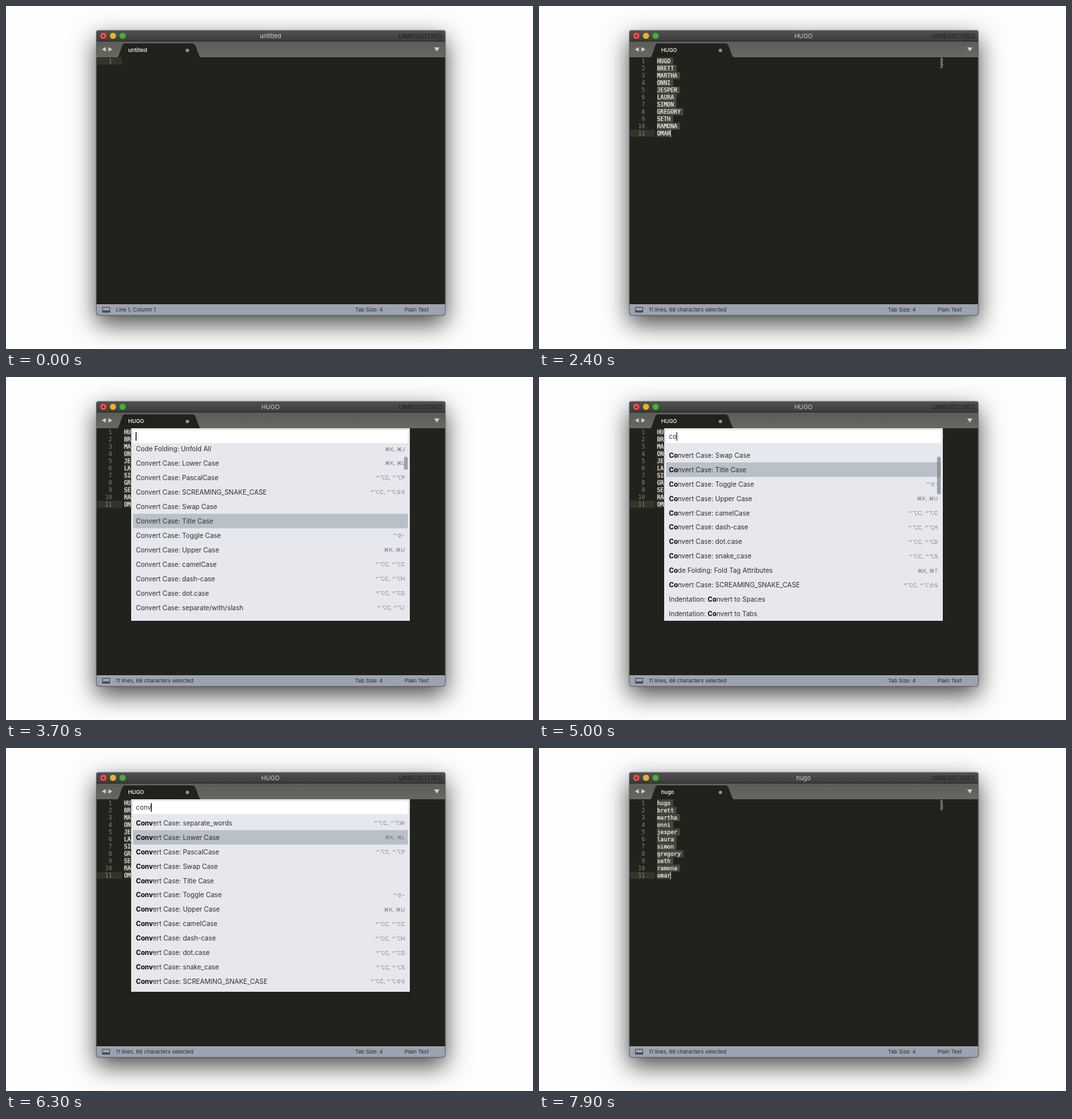
Animation of 800 by 522 pixels, one loop 8000 ms. Source, as an HTML page:

```html
<!DOCTYPE html>
<html lang="en">
<head>
<meta charset="utf-8">
<style>
html, body { margin: 0; width: 100%; height: 100%; overflow: hidden; background: #fefdfe; }
#shadow { position: absolute; left: 137px; top: 37px; width: 530px; height: 434px; border-radius: 4px;
  box-shadow: 0 13px 36px rgba(0,0,0,.72), 0 0 2px rgba(0,0,0,.5); }
svg { position: absolute; left: 0; top: 0; display: block; }
text { font: 10px Inter, "Open Sans", sans-serif; fill: #2e2f33; white-space: pre; }
.b { font-weight: 700; fill: #000; }
.key { font-size: 8px; fill: #74777e; text-anchor: end; }
.title { font-size: 9.2px; fill: #d2d2d2; text-anchor: middle; }
.reg { font-size: 8.7px; fill: #1d1d1d; text-anchor: end; }
.tab { font-size: 8px; font-weight: 500; fill: #fff; }
.status { font-size: 8px; fill: #24272d; }
.code { font: 8.5px "DejaVu Sans Mono", monospace; fill: #f8f8f2; stroke: #f8f8f2; stroke-width: .2px; }
.num { font: 8.5px "DejaVu Sans Mono", monospace; fill: #85867f; text-anchor: end; }
</style>
</head>
<body>
<div id="shadow"></div>
<svg width="800" height="522" viewBox="0 0 800 522">
  <defs>
    <linearGradient id="bar" x2="0" y2="1"><stop stop-color="#515151"/><stop offset="1" stop-color="#3b3b3b"/></linearGradient>
    <linearGradient id="tabs" x2="0" y2="1"><stop stop-color="#595d56"/><stop offset="1" stop-color="#656961"/></linearGradient>
    <clipPath id="win"><rect x="137" y="37" width="530" height="434" rx="4"/></clipPath>
    <clipPath id="list"><rect x="190" y="102" width="423" height="266"/></clipPath>
  </defs>
  <g clip-path="url(#win)">
    <rect x="137" y="37" width="530" height="434" fill="#22221d"/>
    <rect x="137" y="37" width="530" height="17" fill="url(#bar)"/>
    <rect x="137" y="37" width="530" height="1" fill="#6a6a6a"/>
    <rect x="137" y="53" width="530" height="1" fill="#252525"/>
    <rect x="137" y="54" width="530" height="24" fill="url(#tabs)"/>
    <path d="M169 78.5C173 76 175 57 180 57H284C289 57 291 75 296 78.5Z" fill="#22221d"/>
    <rect x="137" y="454" width="530" height="17" fill="#9ca3b0"/>
    <rect x="137" y="454" width="530" height="1" fill="#b0b6c0"/>
  </g>
  <rect x="137.5" y="37.5" width="529" height="433" rx="4" fill="none" stroke="#55565a" stroke-opacity=".6"/>
  <circle cx="147.8" cy="45.4" r="4.7" fill="#fb4a46"/><circle cx="147.8" cy="45.4" r="1.5" fill="#740d0b"/>
  <circle cx="162.4" cy="45.4" r="4.7" fill="#e5b422"/>
  <circle cx="177" cy="45.4" r="4.7" fill="#3fb332"/>
  <path d="M151.5 62.5V69.5L145.5 66ZM155.5 62.5V69.5L161.5 66ZM650 63H658L654 69.5Z" fill="#cdd0cb"/>
  <circle cx="275.4" cy="67.6" r="2.6" fill="#92938f"/>
  <path d="M146.5 458.5H157.500V466H146.500Z" fill="none" stroke="#3f444d"/>
  <rect x="146" y="463.5" width="12" height="2.500" fill="#3f444d"/>
  <text class="reg" x="662" y="49">UNREGISTERED</text>
  <text class="status" x="530" y="465">Tab Size: 4</text>
  <text class="status" x="605" y="465">Plain Text</text>
  <g id="live"></g>
</svg>
<script>
const live = document.getElementById('live');
const ink = document.createElement('canvas').getContext('2d');
ink.font = '10px Inter, "Open Sans", sans-serif';

const PASTE = 300, SELECT = 2300, OPEN = 2700, CLEAR = 3300, TYPE = 4900, RUN = 6700;
const ROW = 21.95, CHAR = 5.12;
const names = ['HUGO', 'BRETT', 'MARTHA', 'ONNI', 'JESPER', 'LAURA', 'SIMON', 'GREGORY', 'SETH', 'RAMONA', 'OMAR'];

const caseKeys = {
  'Lower Case': '⌘K, ⌘L', 'PascalCase': '⌃⌥C, ⌃⌥P', 'SCREAMING_SNAKE_CASE': '⌃⌥C, ⌃⌥⇧S', 'Swap Case': '',
  'Title Case': '', 'Toggle Case': '⌃⇧-', 'Upper Case': '⌘K, ⌘U', 'camelCase': '⌃⌥C, ⌃⌥C', 'dash-case': '⌃⌥C, ⌃⌥H',
  'dot.case': '⌃⌥C, ⌃⌥D', 'separate/with/slash': '⌃⌥C, ⌃⌥/', 'separate_words': '⌃⌥C, ⌃⌥W', 'snake_case': '⌃⌥C, ⌃⌥S'
};
const convert = kind => ['Convert Case: ' + kind, caseKeys[kind]];
const plain = name => [name, ''];
const foldTags = ['Code Folding: Fold Tag Attributes', '⌘K, ⌘T'];

const sortList = [
  ['*Sort* Lines', 'F5'], ['*Sort* Lines (Case Sensitive)', '⌃F5'],
  ['HTMLPrettify: *S*et Keyboard Sh*ort*cuts', '⌥⌘H, k'],
  ...['Java Pr*o*pe*rt*ies', '*R*d (R D*o*cumen*t*ation)', 'G*r*aphviz (D*OT*)', 'Acti*o*nSc*r*ip*t*']
    .map(s => plain('*S*et Syntax: ' + s))
];
const allList = [
  ...['Arithmetic', 'Bookmarks: Clear All', 'Bookmarks: Select All', 'Bookmarks: Select Next',
    'Bookmarks: Select Previous', 'Bookmarks: Toggle', 'Code Folding: Fold', 'Code Folding: Fold All'].map(plain),
  foldTags, plain('Code Folding: Unfold'), ['Code Folding: Unfold All', '⌘K, ⌘J'],
  ...Object.keys(caseKeys).map(convert)
];
const bestList = [
  ...['separate_words', 'Lower Case', 'PascalCase', 'Swap Case', 'Title Case', 'Toggle Case', 'Upper Case',
    'camelCase', 'dash-case', 'dot.case', 'snake_case'].map(convert),
  foldTags, convert('SCREAMING_SNAKE_CASE'),
  plain('Indentation: Convert to Spaces'), plain('Indentation: Convert to Tabs')
];

const rect = (x, y, w, h, fill, more = '') => `<rect x="${x}" y="${y}" width="${w}" height="${h}" fill="${fill}" ${more}/>`;
const text = (cls, x, y, s) => `<text class="${cls}" x="${x}" y="${y}">${s}</text>`;
const bold = s => s.replace(/\*(.+?)\*/g, '<tspan class="b">$1</tspan>');

// Caret opacity: quick fade in, short hold, slow fade out, pause.
function blink(t, period) {
  const p = t % period;
  return p < 300 ? .5 + p / 400 : p < 400 ? 1 : Math.max(0, 1 - (p - 300) / (period - 600));
}

function editor(t) {
  const pasted = t >= PASTE, selected = t >= SELECT, open = t >= OPEN && t < RUN;
  const lines = !pasted ? [''] : t < RUN ? names : names.map(n => n.toLowerCase());
  const last = lines.length - 1, name = lines[0] || 'untitled';
  let out = text('title', 401.5, 48.8, name) + text('tab', 185.5, 70.4, name);
  out += text('status', 166.7, 465, selected ? '11 lines, 66 characters selected'
    : pasted ? 'Line 11, Column 5' : 'Line 1, Column 1');
  out += rect(138, 78.3 + last * 11, 38, 10.8, '#33342a');
  lines.forEach((s, i) => {
    const y = 78.4 + i * 11, width = s.length * CHAR;
    if (selected) out += rect(179, y, width + (i < last ? 4.2 : 0), 10.8, open ? '#36362f' : '#48483f', 'rx="1"');
    out += text('num', 160.8, y + 8.7, i + 1) + text('code', 179.2, y + 8.7, s);
    out += rect(609.6, 78.5 + i * 1.5, s.length * .62, 1.2, '#8b8c86');
  });
  if (pasted && !open) {
    const since = t - (t >= RUN ? RUN : selected ? SELECT : PASTE);
    out += rect(199.2, 188.2, 1.1, 11.6, '#f8f8f0', `opacity="${blink(since, 1100)}"`);
  }
  return out;
}

function palette(t) {
  const typed = Math.min(4, Math.floor((t - TYPE) / 100) + 1);
  const query = t < CLEAR ? 'sort' : t < TYPE ? '' : 'conv'.slice(0, typed);
  let list = sortList, chosen = 0, scroll = 0, thumb = null, fade = 1, bottom = 371;
  if (t < CLEAR) {
    bottom = 260;
  } else if (t < TYPE) {
    const ease = 1 - Math.max(0, 1 - (t - CLEAR) / 400) ** 3;
    list = allList;
    chosen = list.findIndex(c => c[0].endsWith('Title Case'));
    scroll = ease * ((chosen - 5) * ROW + 4.5);
    thumb = [102 + ease * 19.5, 19.5];
    fade = 1 - (t - 3900) / 400;
  } else {
    const find = new RegExp(query, 'i');
    list = bestList.filter(c => find.test(c[0])).map(([s, k]) => [s.replace(find, '*$&*'), k]);
    const early = typed < 3;
    chosen = early ? 4 : 1;
    scroll = early ? 60.85 + (2 - typed) * ROW : 0;
    thumb = early ? [121.5, 57] : [102, 141];
    fade = 1 - (t - 5400) / 400;
  }

  let rows = '';
  list.forEach(([s, key], i) => {
    const y = 114 + i * ROW - scroll;
    if (i === chosen) rows += rect(193, y - 11, 417, 22, '#bac0c9');
    rows += text('', 197.3, y + 3.7, bold(s)) + text('key', 605.5, y + 3, key);
  });
  if (thumb) {
    const alpha = .7 * Math.min(1, Math.max(0, fade));
    rows += rect(604.3, thumb[0], 5.5, thumb[1], '#7c818b', `rx="1.5" opacity="${alpha}"`);
  }

  const width = ink.measureText(query).width;
  const start = t < 3600 ? t : t < 5100 ? 3600 : 5100;
  let out = rect(190, 78, 423, bottom - 78, '#e6e8ed');
  out += `<g clip-path="url(#list)">${rows}</g>` + rect(193, 81, 417, 19.5, '#fff');
  if (t < CLEAR) out += rect(197, 84, width + .5, 13, '#8fb1c3');
  out += text('', 197.3, 94.2, query);
  const alpha = t < 3600 ? 1 : blink(t - start + (t < 3800 ? 200 : 0), 1000);
  return out + rect(196.8 + width, 84, 1.3, 13, '#000', `opacity="${alpha}"`);
}

let shown = -1;
function frame() {
  const t = Math.floor(performance.now() % 8000 / 100) * 100;
  if (t !== shown) {
    live.innerHTML = editor(t) + (t >= OPEN && t < RUN ? palette(t) : '');
    shown = t;
  }
  requestAnimationFrame(frame);
}
frame();
</script>
</body>
</html>
```
